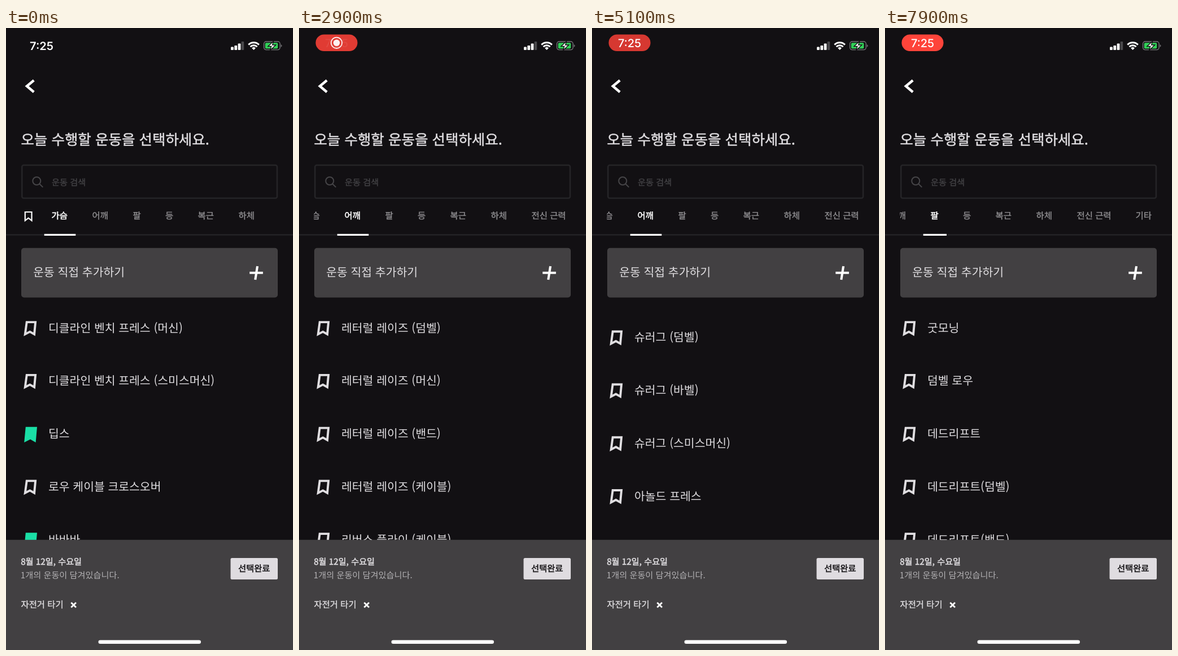
Recreate the animation shown at these times as an HTML page. Size 508 px wide and 1102 px high, loop 8000 ms.

```html
<!DOCTYPE html>
<html lang="ko">
<head>
<meta charset="utf-8">
<title>운동 선택</title>
<style>
  html, body { margin: 0; width: 100%; height: 100%; overflow: hidden; background: #121013; }
  svg { display: block; width: 100vw; height: 100vh; }
  text { font: 400 15.4px "Noto Sans CJK KR", "Noto Sans CJK", "Noto Sans CJK JP", sans-serif; fill: #e0dee1; white-space: pre; text-rendering: geometricPrecision; }
  .item { font-size: 20.45px; }
  .semi { stroke: #e0dee1; stroke-width: .5px; }
  .clock { font: 600 20px Inter, sans-serif; fill: #fff; }
  .tab { fill: #929194; stroke: #929194; stroke-width: .35px; }
  .tab.on { fill: #fff; stroke: #fff; stroke-width: .6px; }
  .line { fill: none; stroke: #fff; }
</style>
</head>
<body>
<svg viewBox="0 0 508 1102" xmlns="http://www.w3.org/2000/svg">
  <defs>
    <clipPath id="listClip"><rect x="-600" y="477.5" width="3000" height="429.5"/></clipPath>
    <clipPath id="tabClip"><rect x="26.5" y="310" width="455" height="50"/></clipPath>
    <path id="mark" class="line" style="stroke:#e0dee1" stroke-width="3.9"
          d="M36.7 -10.4H52.1L50.1 11L42.3 6.6L33.8 11Z"/>
    <path id="markOn" fill="#1adfa6" d="M34.8 -12.3H55L52.6 15.3L43 9.7L32.2 15.3Z"/>
    <path id="plus" class="line" stroke-width="4.1" d="M431.2 433.8H454.8M445 422L441.2 446"/>
  </defs>
  <rect width="508" height="1102" fill="#121013"/>

  <text id="time" class="clock" x="63" y="38.5" text-anchor="middle">7:25</text>
  <g id="pill">
    <rect id="pillBg" x="29.5" y="11.5" width="74" height="29.5" rx="14.75"/>
    <g id="rec">
      <circle class="line" cx="66.5" cy="26.3" r="9.7" stroke-width="1.8"/>
      <circle cx="66.5" cy="26.3" r="5.8" fill="#fff"/>
    </g>
    <text id="pillTime" class="clock" x="66.5" y="33.5" text-anchor="middle" style="font-weight:500">7:25</text>
  </g>

  <g fill="#fff">
    <rect x="398" y="33.5" width="4.8" height="5.5" rx="1"/>
    <rect x="404.3" y="31" width="4.8" height="8" rx="1"/>
    <rect x="410.6" y="27.5" width="4.8" height="11.5" rx="1"/>
    <rect x="416.6" y="24" width="4.6" height="15" rx="1" fill="#49484b"/>
    <path d="M438.5 39l-3.4-3.6a5 5 0 0 1 6.8 0z"/>
  </g>
  <path class="line" stroke-width="2.9" d="M429.2 29.6a13.2 13.2 0 0 1 18.6 0M432.5 33.2a8.5 8.5 0 0 1 12 0"/>
  <rect x="456.5" y="24" width="28.5" height="14.6" rx="4" fill="none" stroke="#77767a" stroke-width="1.4"/>
  <rect x="458.7" y="26.2" width="22.5" height="10.2" rx="2" fill="#32cf58"/>
  <path d="M486.6 29v5q1.8-.8 1.8-2.5t-1.8-2.5z" fill="#77767a"/>
  <path d="M473.5 23.5L463.8 32.5H469.6L467.6 39.5L477.6 30H471.6Z" fill="#fff" stroke="#121013" stroke-width="1.4"/>

  <path class="line" stroke-width="4.5" d="M49.3 92.8L37 103.1L49.3 113.4"/>
  <text class="semi" x="26.4" y="207" style="font-size:25.5px">오늘 수행할 운동을 선택하세요.</text>
  <rect x="28.3" y="243" width="451.6" height="58.5" rx="3" fill="none" stroke="#252427" stroke-width="2.6"/>
  <g class="line" style="stroke:#464548" stroke-width="2">
    <circle cx="54.3" cy="271" r="7"/><path d="M59.4 276.2L65.3 282.1"/>
  </g>
  <text x="81" y="278.5" style="font-size:15.2px;fill:#454447;stroke:#454447;stroke-width:.3px">운동 검색</text>

  <g clip-path="url(#tabClip)"><g id="tabs">
    <path class="line" stroke-width="2.2" d="M33.8 326H45.5V341.3L39.65 336.6L33.8 341.3Z"/>
  </g></g>
  <rect y="365.2" width="508" height="2.4" fill="#242326"/>
  <rect id="underline" x="67.7" y="364.8" height="3.2" fill="#fff"/>

  <g id="pages"></g>

  <rect y="906.8" width="508" height="196" fill="#424042"/>
  <text class="semi" x="26.2" y="950.5" style="font-size:15.2px">8월 12일, 수요일</text>
  <text x="25.8" y="975" style="font-size:15.2px;fill:#b2b0b3">1개의 운동이 담겨있습니다.</text>
  <text class="semi" x="26.5" y="1027" style="stroke-width:.35px">자전거 타기</text>
  <path class="line" stroke-width="2.8" d="M115.3 1018L124 1026.6M124 1018L115.3 1026.6"/>
  <rect x="397.5" y="939" width="83.5" height="38" rx="2.5" fill="#dfdce0"/>
  <text x="439.2" y="962.7" text-anchor="middle" style="font-size:15.3px;fill:#161417;stroke:#161417;stroke-width:.5px">선택완료</text>
  <rect x="163.5" y="1084.5" width="181.5" height="6.6" rx="3.3" fill="#fff"/>
</svg>
<script>
const LOOP = 8000, STEP = 100, PAGE = 508, ROW = 93.75;
const $ = id => document.getElementById(id);

// A leading * marks a bookmarked exercise.
const lists = [
  ['디클라인 벤치 프레스 (머신)', '디클라인 벤치 프레스 (스미스머신)', '*딥스', '로우 케이블 크로스오버',
   '*바바바', '벤치 프레스', '벤치 프레스 (덤벨)', '벤치 프레스 (머신)', '벤치 프레스 (스미스머신)',
   '인클라인 벤치 프레스', '체스트 프레스 (머신)', '케이블 크로스오버', '펙덱 플라이', '푸쉬업'],
  ['레터럴 레이즈 (덤벨)', '레터럴 레이즈 (머신)', '레터럴 레이즈 (밴드)', '레터럴 레이즈 (케이블)',
   '리버스 플라이 (케이블)', '리버스 플라이 (펙덱)', '밀리터리 프레스', '비하인드 넥 프레스',
   '비하인드 넥 프레스 (스미스머신)', '숄더 프레스', '숄더 프레스 (덤벨)', '숄더 프레스 (머신)',
   '숄더 프레스 (바벨)', '슈러그 (덤벨)', '슈러그 (바벨)', '슈러그 (스미스머신)', '아놀드 프레스',
   '업라이트 로우', '페이스 풀'],
  ['덤벨 컬', '*딥스 (머신)', '*라잉 트라이셉 익스텐션', '리버스 리스트 컬 (덤벨)', '리버스 리스트 컬 (바벨)'],
  ['굿모닝', '덤벨 로우', '데드리프트', '데드리프트(덤벨)', '데드리프트(밴드)']
];
const tabNames = { 가슴: 80.5, 어깨: 152.5, 팔: 224.5, 등: 282, 복근: 339.5, 하체: 411.5, '전신 근력': 483.5, 기타: 587.5 };

const row = (name, i) => `<g transform="translate(0 ${531.5 + i * ROW})">
  <use href="#${name[0] === '*' ? 'markOn' : 'mark'}"/>
  <text class="item" x="75" y="7.2">${name.replace('*', '')}</text></g>`;

$('pages').innerHTML = lists.map((list, i) => `<g transform="translate(${i * PAGE} 0)">
  <g clip-path="url(#listClip)"><g id="list${i}">${list.map(row).join('')}</g></g>
  <rect x="27" y="389.8" width="454" height="87.7" rx="5" fill="#424042"/>
  <text class="item" x="48.2" y="440">운동 직접 추가하기</text><use href="#plus"/></g>`).join('');

$('tabs').innerHTML += Object.entries(tabNames)
  .map(([name, x]) => `<text class="tab" x="${x}" y="338">${name}</text>`).join('');
const tabs = document.querySelectorAll('.tab');

const clamp = v => Math.min(1, Math.max(0, v));
const ramp = (t, start, length) => {
  const u = clamp((t - start) / length);
  return u * u * (3 - 2 * u);
};
// Momentum scrolling after a flick.
const flick = (t, start, distance) => distance * (1 - Math.exp(-Math.max(0, t - start) / 500));
// Short drag, then the page snaps into place.
const swipe = (t, start) => {
  const u = t - start;
  if (u <= 0) return 0;
  if (u < 100) return .2 * (u / 100) ** 2;
  return u > 500 ? 1 : 1 - .8 * Math.exp(-(u - 100) / 65);
};
const shift = (id, x, y) => $(id).setAttribute('transform', `translate(${x} ${y})`);

function draw(t) {
  const page = swipe(t, 2026) + swipe(t, 6300) + swipe(t, 7350);
  shift('pages', -page * PAGE, 0);
  shift('list0', 0, -flick(t, 200, 700));
  shift('list1', 0, -flick(t, 3089, 1224));

  const toArms = ramp(t, 6850, 250);
  const tab = ramp(t, 2600, 250) + toArms;
  shift('tabs', -tab * 72, 0);
  $('underline').setAttribute('width', 55.6 - 14.3 * toArms);
  tabs.forEach((el, i) => el.classList.toggle('on', i === Math.round(tab)));

  const pill = ramp(t, 350, 300), clock = ramp(t, 2850, 300);
  const glow = .5 + .5 * Math.cos((t - 2270) / 1900 * 2 * Math.PI);
  $('time').style.opacity = 1 - pill;
  $('pill').style.opacity = pill;
  $('rec').style.opacity = 1 - clock;
  $('pillTime').style.opacity = clock;
  $('pillBg').style.fill = `rgb(${214 + 41 * glow}, ${56 + 12 * glow}, ${49 + 9 * glow})`;
}

const began = performance.now();
function tick() {
  const t = (performance.now() - began) % LOOP;
  draw(Math.floor(t / STEP) * STEP);
  requestAnimationFrame(tick);
}
tick();
</script>
</body>
</html>
```
